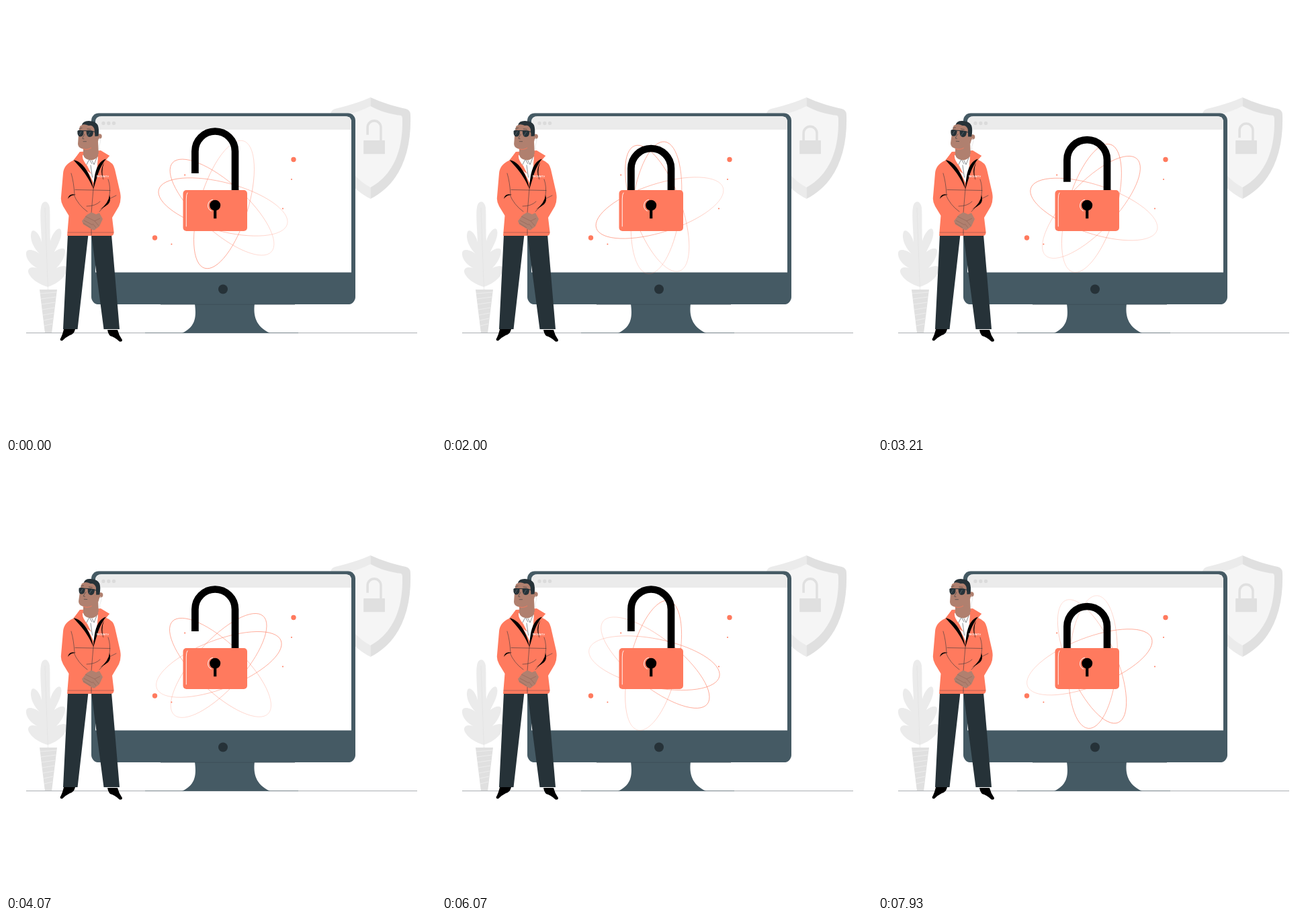
An HTML page for the animation above (8000 ms loop, 640x640 px).

```html
<!DOCTYPE html>
<html lang="en">
<head>
<meta charset="utf-8">
<title>Security guard</title>
<style>
  html, body { margin: 0; width: 100%; height: 100%; overflow: hidden; background: #fff; }
  svg { display: block; width: 100vw; height: 100vh; }
  .line { fill: none; stroke: #263238; stroke-width: .55; stroke-linecap: round; }
  .skin { fill: #b0806f; }
  .coral { fill: #ff7a5e; }
  .dark { fill: #263238; }
  .steel { fill: #455a64; }
</style>
</head>
<body>
<svg viewBox="0 0 640 640">
  <defs>
    <linearGradient id="fade">
      <stop offset="0" stop-color="#ff7a5e"/>
      <stop offset=".55" stop-color="#ff7a5e" stop-opacity=".75"/>
      <stop offset="1" stop-color="#ff7a5e" stop-opacity=".35"/>
    </linearGradient>
    <path id="arch" d="M281.400 274.500V241.800a29.800 29.800 0 0 1 59.600 0V310" fill="none" stroke-width="10.700"/>
  </defs>

  <!-- shield -->
  <path fill="#ebebeb" d="M542.500 136C524 144 507 149 490 153Q483 155 483 162C481 222 501 266 542.500 287Z"/>
  <path fill="#e0e0e0" d="M542.500 136C560 144 577 149 595 153Q602 155 602 162C604 222 584 266 542.500 287Z"/>
  <path fill="#f5f5f5" d="M542.500 149C527 157 512 161 496 163Q494 164 494 168C493 218 509 252 542.500 270C575 252 591 218 590 168Q590 164 588 163C572 161 557 157 542.500 149Z"/>
  <g transform="translate(444.300 108.700) scale(.33333)">
    <use href="#arch" class="shackle" stroke="#e0e0e0"/>
    <rect x="263.500" y="274" width="95.500" height="61" rx="2" fill="#e0e0e0"/>
  </g>

  <!-- plant -->
  <path fill="#ebebeb" d="M62 418C48 414 34 404 33 395C33 388 42 388 49 391C40 388 29 378 30 367C31 360 43 363 50 369C43 362 34 348 38 336C41 330 51 340 53 352C53 340 50 310 52 300C54 288 63 289 65 300C66 312 65 335 66 350C68 340 77 328 81 332C86 340 77 356 72 366C78 361 87 358 88 364C88 375 80 385 75 390C82 387 91 385 91 391C90 403 76 414 62 418Z"/>
  <path fill="none" stroke="#e0e0e0" stroke-width=".6" d="M58 300Q60 360 62.500 422"/>
  <path fill="#e0e0e0" d="M50 422H76L68 487H58Z"/>
  <path fill="none" stroke="#f0f0f0" stroke-width=".8" d="M51 428L75 426M52 436L74 433M53 444L73 441M54 452L72 449M55 460L71 457M56 468L70 465M57 476L69 473"/>

  <!-- monitor -->
  <path stroke="#a8adb0" stroke-width="1" d="M30 486.600H612"/>
  <path class="steel" d="M281 443H370C368 460 371 477 393 486.800H262C284 477 283 460 281 443Z"/>
  <path stroke="#455a64" stroke-width=".5" d="M207 486.500H435"/>
  <rect class="steel" x="127" y="159.500" width="393" height="284.600" rx="11"/>
  <path stroke="#37474f" stroke-width=".6" d="M230 444.200H430"/>
  <path fill="#fff" d="M133 396.500V173Q133 164.300 142 164.300H505Q514 164.300 514 173V396.500Z"/>
  <path fill="#ebebeb" d="M133 184V173Q133 164.300 142 164.300H505Q514 164.300 514 173V184Z"/>
  <g fill="#dbdbdb">
    <circle cx="145" cy="174.500" r="2.700"/><circle cx="152.800" cy="174.500" r="2.700"/><circle cx="160.500" cy="174.500" r="2.700"/>
  </g>
  <circle class="dark" cx="323" cy="421.500" r="7"/>

  <g id="orbits" fill="none" stroke="url(#fade)" stroke-width=".6"></g>
  <g id="dots" class="coral"></g>

  <!-- padlock -->
  <use href="#arch" class="shackle" stroke="#000"/>
  <rect class="coral" x="263.500" y="274" width="95.500" height="61" rx="5"/>
  <path fill="none" stroke="#fff" stroke-width=".9" stroke-linecap="round" d="M268.300 328V287Q268.300 280 270 278"/>
  <path fill="none" stroke="#fff" stroke-width=".9" d="M308 288.200A9 9 0 0 0 306 305.300"/>
  <circle cx="311.200" cy="296.700" r="8"/>
  <path d="M309.100 300H313.300V316.300H309.100Z"/>

  <!-- guard -->
  <path class="dark" d="M92 340H122.500L106.500 481H85ZM127 340H157L169 481H145.500Z"/>
  <path d="M86 481H103Q101 489 95 490Q89 493 84 498Q81 499 80.500 496Q84 490 86 481ZM151 482H166Q168 490 173 497Q173 500 169 499.500Q161 492 155 491Q152 488 151 482Z"/>
  <path class="coral" d="M110 217L141 215L154 223L149 229Q160 233 162 243L170 278Q172 289 168 298L158 315L160.500 336Q161 342 156 342H91L93.500 312L85 298Q81 291 82 284L85 249Q86 236 100 230Z"/>
  <path fill="#fff" d="M113 222L137 219Q137 242 130.500 264Q123 246 112 233Z"/>
  <path class="line" d="M120 236L124 228L128 235M128 230L131 236L135 226M126 237L128.500 255"/>
  <path class="skin" d="M115 207L137 202L138 223Q131 231 124 229Q117 228 115 222Z"/>
  <path class="coral" d="M110 217L114 222Q113 229 121 238L127 250L101 230ZM140 215L154 223L143 232L132 258Q138 236 137 221Z"/>
  <path d="M100.500 229.300C112 231 125 245 130.300 273C122 253 113 243 100.500 229.300ZM149 227.500C137 231 131 245 130 273C135 257 138 241 149 227.500ZM146 233Q141 246 145.500 259.500Q138.500 246 146 233Z"/>
  <path d="M92 287Q94 278 104 281Q96 281 92 287ZM140 303Q153 293 154 281Q157 290 152 295Q147 299 140 303Z"/>
  <path class="line" d="M130 272L127 308M103 273.500L155 274.500M97 249Q101 262 102 281M152 258Q156 269 154 282M154 287L164 282M101 281Q107 296 121 306M139 306L144 301M127 332V341M120 298Q133 298 140 291"/>
  <path class="line" opacity=".6" d="M92 337L160 337"/>
  <text x="134.500" y="254.600" transform="rotate(2 134 254)" fill="#fff" font-family="Inter, Arial, sans-serif" font-size="3.700" font-weight="700">SECURITY</text>
  <path class="skin" d="M113 320L120 311L127 307L134 310L139 308L144 317L139 328L131 334L125 331L115 325Z"/>
  <path fill="none" stroke="#875b4e" stroke-width=".5" d="M118 313L132 320L140 316M116 319L129 326M115 323L126 330M132 320L138 327M129 324L134 330"/>

  <g id="head">
    <circle class="skin" cx="139" cy="194" r="3.700"/>
    <path class="skin" d="M110 179Q122 170 136 178L138 197Q136 211 127 213Q120 215 112 212Q107 210 107 205L108.500 185Z"/>
    <path class="dark" d="M113 177.500Q114 171 123 171Q133 171 136.500 177Q139 183 137.500 193.500L132.500 194L131.500 183Q129 176.500 123 178Q116 175 113 177.500Z"/>
    <path fill="none" stroke="#263238" stroke-width="1" d="M107 186Q118 185 129 186.500L137 189"/>
    <path class="dark" d="M106.300 186Q110 183.500 115.500 186Q116 194 111 194.500Q106 195 106.300 186ZM119.500 186Q124 184 129.800 186.300Q130.500 194.500 124.700 195Q119.500 195 119.500 186Z"/>
    <path fill="none" stroke="#627078" stroke-width=".7" d="M109 192L112 186.500M122 193L125.500 187"/>
    <path class="line" d="M117 191Q113.500 196 114 197.500L116 197.700M115 201.700L119.500 201.700M109 182.500L113 181.500M121 183L126 183.500"/>
    <path fill="none" stroke="#ff7a5e" stroke-width=".8" d="M114 212.500Q121 215 127 211"/>
    <path fill="none" stroke="#e6e6e6" stroke-width=".8" d="M139 196Q142 200 140 204T139 213"/>
  </g>
</svg>
<script>
const LOOP = 8000, STEP = 71.48, START = 138.5, HOLD = 205;
const SPIN = 0.02975; // degrees per ms
const NS = 'http://www.w3.org/2000/svg';
const byId = id => document.getElementById(id);

function add(parent, tag, attrs) {
  const node = document.createElementNS(NS, tag);
  for (const key in attrs) node.setAttribute(key, attrs[key]);
  return parent.appendChild(node);
}

const orbits = [[3.5, 1.5, 15], [2, 2, 42], [5, -2, -73]];
for (const [x, y, tilt] of orbits)
  add(byId('orbits'), 'ellipse', { rx: 99, ry: 36, transform: `translate(${x} ${y}) rotate(${tilt})` });

const dots = [[428, 228.5, 3.7], [221.5, 345, 3.7], [246.4, 354.5, 1], [425, 258, 1], [412, 301.5, 1], [266.2, 251.4, 1]];
for (const [cx, cy, r] of dots) add(byId('dots'), 'circle', { cx, cy, r });

const shackles = document.querySelectorAll('.shackle');

function ease(t, from, to) {
  const p = Math.min(1, Math.max(0, (t - from) / (to - from)));
  return (1 - Math.cos(Math.PI * p)) / 2;
}

// The motion advances in even steps after a short opening hold.
function stepped(ms) {
  return START + STEP * Math.max(0, Math.floor((ms - HOLD) / STEP) + 1);
}

function render(ms) {
  const t = stepped(ms % LOOP);
  const open = 1 - ease(t, 660, 1360) + ease(t, 2860, 3560) - ease(t, 7100, 7800);
  const turn = ease(t, 1600, 3400) - ease(t, 4400, 6140);
  for (const s of shackles) s.setAttribute('transform', `translate(0 ${-25.5 * open})`);
  byId('orbits').setAttribute('transform', `translate(319.5 297.5) rotate(${SPIN * (t - START)})`);
  byId('head').setAttribute('transform', `rotate(${3.5 * turn} 123 222)`);
}

const begin = performance.now();
function tick() {
  render(performance.now() - begin);
  requestAnimationFrame(tick);
}
tick();
</script>
</body>
</html>
```
